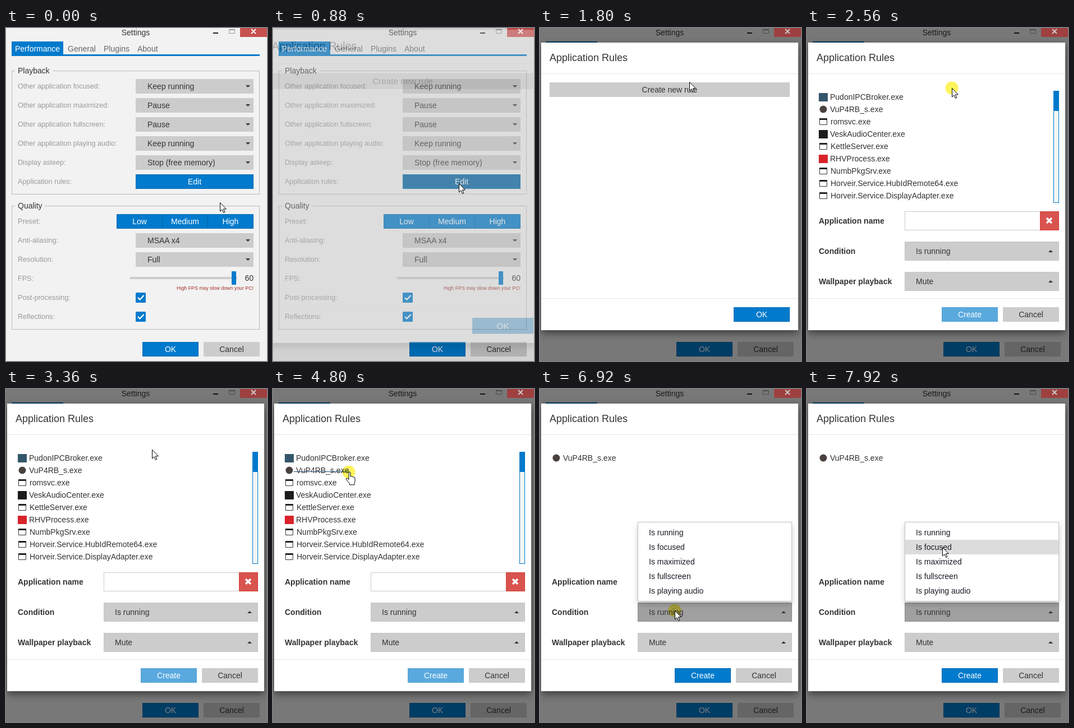
These frames come from a looping animation (465 by 594 pixels, 8 s). An HTML page:

```html
<!DOCTYPE html>
<html lang="en">
<head>
<meta charset="utf-8">
<title>Settings</title>
<style>
html, body { margin: 0; width: 100%; height: 100%; overflow: hidden; background: #f2f2f2; }
svg { display: block; width: 465px; height: 594px; font: 14px "Liberation Sans", Arial, sans-serif; }
text { white-space: pre; }
#modal { filter: drop-shadow(0 5px 7px rgba(0, 0, 0, .5)); }
#menu { filter: drop-shadow(0 5px 5px rgba(0, 0, 0, .2)); }
#click { mix-blend-mode: multiply; }
</style>
</head>
<body>
<svg id="stage" viewBox="0 0 465 594"></svg>
<script>
const LOOP = 8000;
const BLUE = '#007acc', GREY = '#ccc', HOVER = '#b2b2b2', INK = '#333';

const rect = (x, y, w, h, fill, extra = '') =>
  `<rect x="${x}" y="${y}" width="${w}" height="${h}" fill="${fill}" ${extra}/>`;
const framed = (x, y, w, h, fill, stroke, extra = '') =>
  rect(x + .5, y + .5, w - 1, h - 1, fill, `stroke="${stroke}" ${extra}`);
const text = (x, y, label, fill = INK, extra = '') =>
  `<text x="${x}" y="${y}" fill="${fill}" ${extra}>${label}</text>`;
const path = (d, fill, extra = '') => `<path d="${d}" fill="${fill}" ${extra}/>`;
const group = (id, ...parts) => `<g id="${id}">${parts.join('')}</g>`;
const centred = 'text-anchor="middle"';
const bold = 'font-weight="bold"';

function button(x, y, w, label, primary, id = '') {
  const box = primary
    ? framed(x, y, w, 26, BLUE, '#006bb3', `id="${id}"`)
    : rect(x, y, w, 26, GREY, `id="${id}"`);
  return box + text(x + w / 2, y + 18, label, primary ? '#fff' : INK, centred);
}

const caret = (x, y, up) => path(`M${x} ${y}h8l-4 ${up ? -4 : 4}z`, INK);

function fieldset(y, h, legend, gap) {
  return framed(10, y, 442, h, 'none', '#bbb') + rect(16, y - 4, gap, 10, '#f2f2f2') +
    text(21, y + 5, legend);
}

const label = (y, s) => text(21, y + 4, s, '#999', 'font-size="12.6"');
const select = (y, s) => rect(231, y - 13, 210, 26, GREY) + text(252, y + 5, s) + caret(427, y - 2);

function checkbox(y) {
  return rect(231, y, 18, 18, BLUE, 'rx="1.5"') +
    path(`M235 ${y + 9}l3.5 3.5l7-7.5`, 'none', 'stroke="#fff" stroke-width="2.2"');
}

function settingsPage() {
  const playback = [
    ['Other application focused:', 'Keep running'],
    ['Other application maximized:', 'Pause'],
    ['Other application fullscreen:', 'Pause'],
    ['Other application playing audio:', 'Keep running'],
    ['Display asleep:', 'Stop (free memory)']
  ];
  const tabs = [[110, 'General'], [174, 'Plugins'], [234, 'About']];
  const presets = [[238, 'Low'], [319, 'Medium'], [400, 'High']];
  return [
    rect(0, 0, 465, 594, '#f2f2f2'),
    text(231, 13, 'Settings', INK, centred),
    rect(369, 8, 9, 2, '#222'),
    path('M397.5 2.5h10v7h-10zM397 3.5h11', 'none', 'stroke="#999"'),
    rect(10, 24, 92, 24, BLUE), rect(10, 47, 442, 3, BLUE),
    text(16, 42, 'Performance', '#fff'),
    ...tabs.map(([x, s]) => text(x, 42, s, '#666')),
    fieldset(76, 221, 'Playback', 67),
    ...playback.map(([name, value], i) => label(104 + 34 * i, name) + select(104 + 34 * i, value)),
    label(274, 'Application rules:'), button(231, 261, 210, 'Edit', true, 'edit'),
    fieldset(317, 221, 'Quality', 53),
    label(345, 'Preset:'), framed(197, 332, 244, 26, BLUE, '#006bb3'),
    rect(278, 332, 1, 26, '#0062a3'), rect(359, 332, 1, 26, '#0062a3'),
    ...presets.map(([x, s]) => text(x, 350, s, '#fff', centred)),
    label(379, 'Anti-aliasing:'), select(379, 'MSAA x4'),
    label(413, 'Resolution:'), select(413, 'Full'),
    label(447, 'FPS:'), rect(221, 444, 191, 4, GREY), rect(402, 434, 8, 24, BLUE),
    text(441, 451, '60', INK, 'text-anchor="end"'),
    text(441, 467, 'High FPS may slow down your PC!', '#a03028', 'text-anchor="end" font-size="8.8"'),
    label(481, 'Post-processing:'), checkbox(472),
    label(515, 'Reflections:'), checkbox(506),
    button(243, 560, 100, 'OK', true), button(352, 560, 100, 'Cancel')
  ].join('');
}

const windowIcon = y => path(`M22.5 ${y - 5.5}h13v11h-13z`, '#fff', 'stroke="#333"') +
  rect(22, y - 6, 14, 3, '#222');
const squareIcon = color => y => rect(21, y - 7, 16, 15, color);
const roundIcon = y => `<circle cx="29" cy="${y}" r="6.5" fill="#4a403e"/>`;

const CHOSEN = 'VuP4RB_s.exe';
const APPS = [
  ['PudonIPCBroker.exe', squareIcon('#34566b')],
  [CHOSEN, roundIcon],
  ['romsvc.exe', windowIcon],
  ['VeskAudioCenter.exe', squareIcon('#1c1c1c')],
  ['KettleServer.exe', windowIcon],
  ['RHVProcess.exe', squareIcon('#d8232a')],
  ['NumbPkgSrv.exe', windowIcon],
  ['Horveir.Service.HubIdRemote64.exe', windowIcon],
  ['Horveir.Service.DisplayAdapter.exe', windowIcon]
];
const appRow = ([name, icon], y) => icon(y) + text(icon === windowIcon ? 42 : 41, y + 5, name);

const dropUp = (y, id, value) =>
  framed(174, y, 275, 34, GREY, '#c6c6c6', `id="${id}"`) + text(194, y + 22, value) + caret(430, y + 19, true);

const CONDITIONS = ['Is running', 'Is focused', 'Is maximized', 'Is fullscreen', 'Is playing audio'];

function modalWindow() {
  return group('modal',
    rect(2, 26, 458, 513, '#fff'),
    text(17, 59, 'Application Rules', INK, 'font-size="18"'),
    rect(2, 81, 458, 1, '#e5e5e5'), rect(2, 482, 458, 1, '#e5e5e5'),
    group('overview',
      button(17, 97, 428, 'Create new rule', false, 'newRule'),
      button(345, 498, 100, 'OK', true)),
    group('form',
      group('list',
        ...APPS.map((app, i) => appRow(app, 123 + 22 * i)),
        rect(37, 147, 99, 1, '#23527c', 'id="underline"'),
        framed(439, 112, 10, 200, '#f5f5f5', BLUE), rect(439, 112, 10, 36, BLUE)),
      group('filtered', appRow(APPS[1], 123)),
      text(21, 349, 'Application name', INK, bold),
      framed(174, 327, 242, 34, '#fff', GREY),
      text(186, 349, CHOSEN, '#555', 'id="typed"'),
      framed(415, 327, 34, 34, '#d9534f', '#d43f3a'),
      path('M427 339l9 9m0-9l-9 9', 'none', 'stroke="#fff" stroke-width="3.6"'),
      text(21, 403, 'Condition', INK, bold), dropUp(381, 'condition', 'Is running'),
      text(21, 457, 'Wallpaper playback', INK, bold), dropUp(435, 'wallpaper', 'Mute'),
      button(240, 498, 100, 'Create', true, 'create'),
      button(349, 498, 100, 'Cancel'),
      group('menu',
        framed(174, 237, 275, 142, '#fff', '#c4c4c4'),
        rect(175, 0, 273, 26, '#dcdcdc', 'id="choice"'),
        ...CONDITIONS.map((s, i) => text(194, 261 + 26 * i, s, '#1a1a26')))));
}

const stage = document.getElementById('stage');
stage.innerHTML = settingsPage() +
  rect(0, 0, 465, 594, '#000', 'id="shade"') +
  group('close',
    rect(417, 0, 48, 16, '#c75050'),
    path('M437 2l8 8m0-8l-8 8', 'none', 'stroke="#fff" stroke-width="1.8"'),
    rect(417, 0, 48, 16, '#000', 'id="closeShade"')) +
  modalWindow() +
  '<circle id="click" r="11.5" fill="#fff45c"/>' +
  group('pointer',
    path('M.5.5V16L4 12.7L6.5 18.4L8.9 17.3L6.4 11.8H11.3Z', '#fff', 'id="arrow" stroke="#000"'),
    path('M0 2Q0 0 1.5 0T3 2V8Q4.5 6.8 5.8 8.5Q7.5 7.5 8.7 9.3Q11 8.6 11 11V16Q11 18.5 10 20V23H1.5V20.5' +
      'Q-2 17.5-4.5 13Q-5 10.5-2.5 11.3L0 13.5Z', '#fff', 'id="hand" stroke="#000"'));

const el = {};
stage.querySelectorAll('[id]').forEach(node => { el[node.id] = node; });
const set = (id, name, value) => el[id].setAttribute(name, value);
const show = (id, on) => set(id, 'display', on ? 'inline' : 'none');
const clamp = v => Math.min(1, Math.max(0, v));

// Pointer stops: time, x, y
const ROUTE = [
  [80, 381, 311], [600, 331, 277],
  [1340, 331, 277], [1800, 266, 96],
  [1980, 266, 96], [2320, 258, 107],
  [2900, 258, 107], [2920, 259, 108],
  [3340, 259, 108], [3560, 279, 121], [4180, 135, 148],
  [5300, 135, 148], [5800, 271, 460], [5960, 278, 445], [6120, 276, 442],
  [6180, 276, 442], [6640, 240, 395],
  [7660, 240, 395], [7920, 241, 282]
];
const CLICKS = [[640, 840], [2400, 2640], [4800, 4960], [6760, 7000]];
const OPEN = 840, FORM = 2560, PICK = 4880, MENU = 6880;

function pointerAt(t) {
  const next = ROUTE.findIndex(stop => stop[0] > t);
  if (next === 0) return ROUTE[0].slice(1);
  if (next < 0) return ROUTE[ROUTE.length - 1].slice(1);
  const [t0, x0, y0] = ROUTE[next - 1], [t1, x1, y1] = ROUTE[next];
  const p = (t - t0) / (t1 - t0), e = p * p * (3 - 2 * p);
  return [Math.round(x0 + (x1 - x0) * e), Math.round(y0 + (y1 - y0) * e)];
}

function render(t) {
  const [x, y] = pointerAt(t);
  const over = (left, top, w, h) => x >= left && x < left + w && y >= top && y < top + h;

  const p = clamp((t - OPEN) / 280);
  const fade = clamp(p * 1.8);
  const scale = 1 + .122 * (1 - p) ** 2;
  show('modal', p > 0);
  set('modal', 'opacity', fade);
  set('modal', 'transform', `translate(231 282.5) scale(${scale}) translate(-231 -282.5)`);
  set('shade', 'opacity', fade * .5);
  set('closeShade', 'opacity', fade * .2);

  const form = t >= FORM, picked = t >= PICK, menu = t >= MENU;
  show('overview', !form);
  show('form', form);
  show('list', !picked);
  show('filtered', picked);
  show('typed', picked);
  show('menu', menu);

  const link = form && !picked && over(37, 136, 99, 20);
  show('underline', link);
  show('hand', link);
  show('arrow', !link);

  set('edit', 'fill', over(231, 261, 210, 26) ? '#0062a3' : BLUE);
  set('newRule', 'fill', over(17, 97, 428, 26) ? HOVER : GREY);
  set('create', 'fill', picked ? BLUE : '#59a9de');
  set('create', 'stroke', picked ? '#006bb3' : '#59a4d4');
  const onCondition = over(174, 381, 275, 34), onWallpaper = over(174, 435, 275, 34);
  set('condition', 'fill', menu ? '#a0a0a0' : onCondition ? HOVER : GREY);
  set('condition', 'stroke', menu ? '#8c8c8c' : onCondition ? '#adadad' : '#c6c6c6');
  set('wallpaper', 'fill', onWallpaper ? HOVER : GREY);
  set('wallpaper', 'stroke', onWallpaper ? '#adadad' : '#c6c6c6');

  const item = Math.floor((y - 243) / 26);
  show('choice', item >= 0 && item < CONDITIONS.length);
  set('choice', 'y', 243 + 26 * item);

  show('click', CLICKS.some(([from, to]) => t >= from && t < to));
  set('click', 'transform', `translate(${x} ${y})`);
  set('pointer', 'transform', `translate(${x} ${y})`);
}

const start = performance.now();
function tick() {
  render((performance.now() - start) % LOOP);
  requestAnimationFrame(tick);
}
tick();
</script>
</body>
</html>
```
